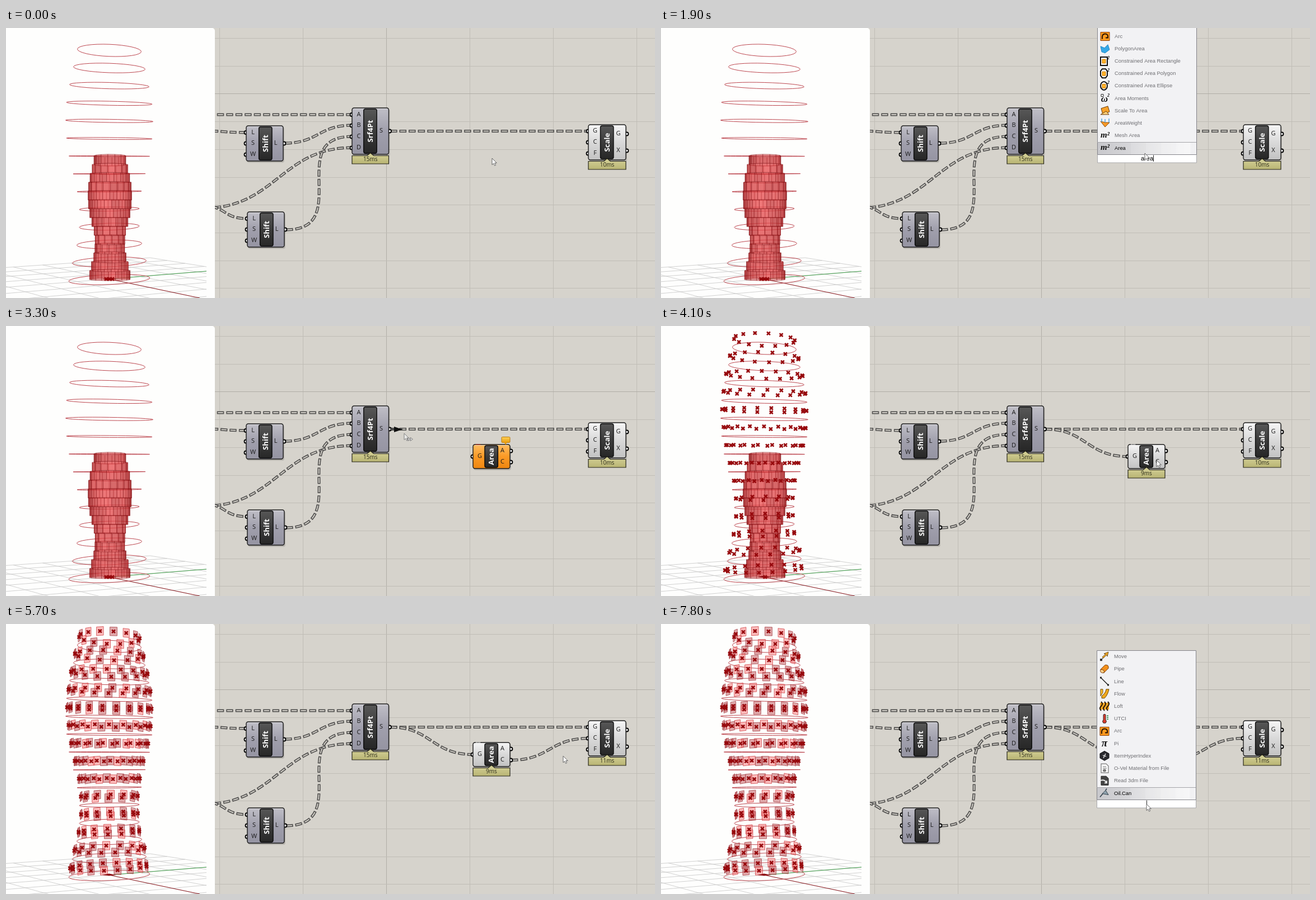
Write an HTML page with a canvas that moves like this. It is 1159x483 px and loops after 8 s.

```html
<!DOCTYPE html>
<html lang="en">
<head>
<meta charset="utf-8">
<title>Node editor: area and scale</title>
<style>
html, body { margin: 0; width: 100%; height: 100%; overflow: hidden; background: #d6d3cc; }
canvas { display: block; width: 1159px; height: 483px; }
</style>
</head>
<body>
<canvas id="stage"></canvas>
<script>
const W = 1159, H = 483, LOOP = 8000, TAU = Math.PI * 2;
const canvas = document.getElementById('stage');
const dpr = window.devicePixelRatio || 1;
canvas.width = W * dpr;
canvas.height = H * dpr;
const c = canvas.getContext('2d');

// ---------- helpers ----------
const SANS = '"Liberation Sans", Arial, sans-serif';
const UI = '"Open Sans", "Noto Sans", sans-serif';

function txt(s, x, y, font, color, align = 'center') {
  c.font = font;
  c.fillStyle = color;
  c.textAlign = align;
  c.textBaseline = 'middle';
  c.fillText(s, x, y);
}
function line(x1, y1, x2, y2, color, w = 1) {
  c.beginPath();
  c.moveTo(x1, y1);
  c.lineTo(x2, y2);
  c.strokeStyle = color;
  c.lineWidth = w;
  c.stroke();
}
function box(x, y, w, h, r, fill, stroke, lw = 1) {
  c.beginPath();
  c.roundRect(x, y, w, h, r);
  if (fill) { c.fillStyle = fill; c.fill(); }
  if (stroke) { c.strokeStyle = stroke; c.lineWidth = lw; c.stroke(); }
}
function poly(points, fill, stroke, lw = 1) {
  c.beginPath();
  points.forEach(([x, y], i) => i ? c.lineTo(x, y) : c.moveTo(x, y));
  c.closePath();
  if (fill) { c.fillStyle = fill; c.fill(); }
  if (stroke) { c.strokeStyle = stroke; c.lineWidth = lw; c.stroke(); }
}
function fade(x1, y1, x2, y2, ...colors) {
  const g = c.createLinearGradient(x1, y1, x2, y2);
  colors.forEach((k, i) => g.addColorStop(i / (colors.length - 1), k));
  return g;
}
const rand = n => { const v = Math.sin(n * 127.1 + 11.7) * 43758.5453; return v - Math.floor(v); };

// ---------- 3D view ----------
const CX = 184.5, EYE = 245;
const RX = [57, 64, 71, 76.5, 78, 76.5, 72, 64.5, 57.5, 53.5, 53.5, 58, 66, 72.5];
const RY = [10.8, 8.4, 5.6, 3.6, 2.8, 1.7, .5, .4, 1.3, 3.6, 6.2, 7.6, 8.6, 8.8];
const ROW_RY = [11.4, 9, 6.8, 4.8, 3.8, 2.3, .8, .6, 1, 3.3, 4, 5.2, 6.4, 6.8];
// x of one marker near the middle of each row: upper arc, lower arc
const UP = [192, 199, 180, 190, 197, 184, 173, 186, 180, 187, 186, 181, 179, 173];
const LOW = [180, 193, 188, 183, 172, 196, 190, 175, 191, 183, 187, 182, 195, 175];
const ringY = i => 40 + 31.54 * i;
const slope = y => -.0002 * (y - EYE);
const sides = i => Math.round(TAU * RX[i] / 26);

const markers = [];
RX.forEach((r, i) => {
  const rx = r - 2.5, cy = ringY(i) - 15.8, step = TAU / sides(i);
  [[UP[i], -1], [LOW[i], 1]].forEach(([x0, dir]) => {
    const a0 = Math.asin((x0 - CX) / rx);
    for (let k = -9; k <= 9; k++) {
      const a = a0 + k * step;
      if (Math.abs(a) > Math.PI / 2) continue;
      const dx = rx * Math.sin(a);
      markers.push({
        x: CX + dx, y: cy + slope(cy) * dx + dir * ROW_RY[i] * Math.cos(a),
        w: 1.5 + 11.5 * Math.cos(a), lit: Math.cos(a) > .45 && rand(markers.length) > .5, a
      });
    }
  });
});

function ground(u, v) {
  const p = u * .034, q = v * .0216, w = 1 + p + q;
  return [(184 - 806 * p + 2780 * q) / w, (449 + 240 * p + 240 * q) / w];
}
function drawGround() {
  c.save();
  c.beginPath();
  c.rect(0, 0, 358, H);
  c.clip();
  for (let u = -6; u <= 4; u++) line(...ground(u, -7), ...ground(u, 4), '#c6c6c6', .8);
  for (let v = -7; v <= 4; v++) line(...ground(-6, v), ...ground(4, v), '#c6c6c6', .8);
  line(184, 449, 358, 435, '#3c9a46');
  line(184, 449, 346, 483, '#8f1c22');
  c.restore();
}
function drawRings() {
  RX.forEach((r, i) => {
    const y = ringY(i);
    c.beginPath();
    c.ellipse(CX, y, r, RY[i], Math.atan(slope(y)), 0, TAU);
    c.strokeStyle = '#b5323c';
    c.lineWidth = .9;
    c.stroke();
  });
}
function drawTower() {
  RX.forEach((r, i) => {
    const rx = r / 2, top = 228.5 + i * 15.8, n = sides(i), step = TAU / n;
    const quads = [];
    for (let k = 0; k < n; k++) quads.push(rand(i) * step + k * step);
    quads.sort((a, b) => Math.cos(a + step / 2) - Math.cos(b + step / 2));
    quads.forEach((a, k) => {
      const at = (b, y) => [185.5 + rx * Math.sin(b), y + RY[i] * .25 * Math.cos(b) * (i < 7 ? -1 : 1)];
      const f = Math.abs(Math.cos(a + step / 2)), s = rand(i * 31 + k) * 40;
      const fill = `rgba(${172 + 66 * f - s},${28 + 56 * f - s * .6},${30 + 56 * f - s * .6},.53)`;
      poly([at(a, top), at(a + step, top), at(a + step, top + 16), at(a, top + 16)], fill, 'rgba(125,14,18,.5)', .8);
    });
  });
}
function cross(x, y) {
  const d = 2.9;
  line(x - d, y - d, x + d, y + d, '#970a0e', 2.7);
  line(x - d, y + d, x + d, y - d, '#970a0e', 2.7);
}
function drawPanel(m) {
  const h = 7.7, t = Math.sin(m.a) * 1.2;
  poly([[m.x - m.w / 2, m.y - h - t], [m.x + m.w / 2, m.y - h + t], [m.x + m.w / 2, m.y + h + t], [m.x - m.w / 2, m.y + h - t]],
    m.lit ? 'rgba(250,110,110,.45)' : 'rgba(185,55,60,.42)', m.lit ? '#d0484c' : '#a5454a', .8);
}
function drawView(T) {
  box(-10, 0, 383, H + 10, 5, '#fefefd');
  drawGround();
  drawRings();
  const scaled = T >= 5600;
  if (!scaled) drawTower();
  else markers.forEach(drawPanel);
  poly([[172, 449], [184, 446.5], [197, 449], [184, 450.5]], '#8f1015');
  if (T >= 4000) markers.forEach(m => cross(m.x, m.y));
  if (T < 4000) [179, 185, 190].forEach(x => cross(x, 449));
  else if (!scaled) cross(186, 449);
}

// ---------- wires ----------
function path(x1, y1, x2, y2, pull) {
  c.beginPath();
  c.moveTo(x1, y1);
  c.bezierCurveTo(x1 + pull, y1, x2 - pull, y2, x2, y2);
}
function wire(x1, y1, x2, y2, pull = (x2 - x1) / 2) {
  path(x1, y1, x2, y2, pull);
  c.setLineDash([12.5, 4]);
  c.strokeStyle = '#4d4c4b';
  c.lineWidth = 5;
  c.stroke();
  c.setLineDash([9.5, 7]);
  c.lineDashOffset = -1.5;
  c.strokeStyle = '#d0cdc6';
  c.lineWidth = 2;
  c.stroke();
  c.setLineDash([]);
  c.lineDashOffset = 0;
}
function looseWire(x1, y1, x2, y2) {
  path(x1, y1, x2, y2, (x2 - x1) / 2);
  c.strokeStyle = '#505050';
  c.lineWidth = 3;
  c.stroke();
  if (x2 - x1 < 30) poly([[x2 - 15, y2 - 5], [x2, y2], [x2 - 15, y2 + 5]], '#111');
}

// ---------- components ----------
const PURPLE = ['#c0bfc7', '#a09fac', '#9594a2'];
const LIGHT = ['#f6f6f6', '#d9d9d9', '#c2c2c2'];
const ORANGE = ['#ffbd62', '#fb9a26', '#ef8610'];

function node({ x, y, w, h, name, skin, ins, outs, time, mid = x + w / 2 - .3 }) {
  const grip = (gx, gy) => {
    c.beginPath();
    c.arc(gx, gy, 3, 0, TAU);
    c.fillStyle = '#fff';
    c.fill();
    c.strokeStyle = '#000';
    c.lineWidth = 1.8;
    c.stroke();
  };
  box(x + 1, y + 2, w + 1, h + 1, 4, 'rgba(0,0,0,.14)');
  ins.forEach(p => grip(x - .5, p[1]));
  outs.forEach(p => grip(x + w + 1.5, p[1]));
  box(x, y, w, h, 3.5, fade(0, y, 0, y + h, ...skin), '#1c1c1c', 1.4);
  line(x + 3, y + 1.5, x + w - 3, y + 1.5, 'rgba(255,255,255,.55)');
  box(mid - 11.7, y + 2, 23.4, h - 4, 3, fade(0, y, 0, y + h, '#595959', '#3b3b3b', '#262626'), '#080808', 1.4);
  c.save();
  c.translate(mid + 1, y + h / 2);
  c.rotate(-Math.PI / 2);
  txt(name, 0, 0, `bold 13.2px ${UI}`, '#fff');
  c.restore();
  ins.forEach(p => txt(p[0], x + 12, p[1], `11px ${UI}`, '#1a1a1a'));
  outs.forEach(p => txt(p[0], x + w - 13.5, p[1], `11px ${UI}`, '#1a1a1a'));
  if (time) {
    const ty = y + h + 2.5, m = x + w / 2;
    poly([[x, ty], [m - 6, ty], [m, ty - 5], [m + 6, ty], [x + w, ty], [x + w, ty + 14.5], [x, ty + 14.5]],
      fade(0, ty - 3, 0, ty + 14, '#d3cf96', '#b9b574'), '#26251a', 1.2);
    txt(time, m, ty + 7.3, `10px ${UI}`, '#2a2917');
  }
}
function shift(x, y) {
  node({ x, y, w: 66, h: 63, name: 'Shift', skin: PURPLE, mid: x + 34.3,
    ins: [['L', y + 12], ['S', y + 31.5], ['W', y + 51.5]], outs: [['L', y + 31.5]] });
}
function areaNode(done) {
  node({ x: 834, y: 212, w: 66, h: 43, name: 'Area', skin: done ? LIGHT : ORANGE,
    ins: [['G', 233.5]], outs: [['A', 223.5], ['C', 243.5]], time: done && '9ms' });
  for (let k = 0; k < 3; k++) line(839 + k * 3, 212, 841 + k * 3, 212, done ? '#ddd' : '#c42a12', 1.4);
  if (!done) {
    box(885, 198.5, 15, 10, 1.5, fade(0, 198, 0, 209, '#ffd35a', '#e79a0c'), '#b87a10');
    poly([[889, 208], [893, 213], [894, 208]], '#e79a0c');
  }
}
function drawCanvas(T) {
  c.fillStyle = '#d6d3cc';
  c.fillRect(0, 0, W, H);
  const gridColor = i => i === 2 ? '#b0ada6' : '#c0bdb6';
  for (let i = 0; i < 6; i++) {
    const x = 381.5 + i * 149;
    line(x, 0, x, H, gridColor(i));
  }
  for (let i = 0; i < 10; i++) {
    const y = Math.floor(18.5 + i * 49.7) + .5;
    line(373, y, W, y, gridColor(i));
  }

  wire(360, 155, 618, 155);
  wire(350, 184, 429, 187);
  wire(498, 206, 618, 174);
  wire(355, 322, 618, 214, 125);
  wire(350, 318, 431, 341, 45);
  wire(500, 361, 618, 194, 121);
  wire(686, 184.5, 1040, 184.5);
  if (T >= 4000) wire(686, 184.5, 834, 233.5);
  if (T >= 5600) wire(902, 243.5, 1040, 204.5);

  shift(429, 175);
  shift(431, 329);
  node({ x: 618, y: 143, w: 65.5, h: 83, name: 'Srf4Pt', skin: PURPLE, time: '15ms',
    ins: [['A', 155], ['B', 174.5], ['C', 194.5], ['D', 214.5]], outs: [['S', 184.5]] });
  node({ x: 1040, y: 173, w: 67, h: 63, name: 'Scale', skin: LIGHT, time: T < 5600 ? '10ms' : '11ms',
    ins: [['G', 184.5], ['C', 204.5], ['F', 224.5]], outs: [['G', 189.5], ['X', 219.5]] });
  if (T >= 2200) areaNode(T >= 4000);

  const [mx, my] = mouse(T);
  if (T >= 3300 && T < 4000) looseWire(686, 184.5, Math.min(mx - 3, 834), my - 7);
  if (T >= 4600 && T < 5600) T >= 5100 ? looseWire(902, 243.5, 1040, 204.5) : looseWire(902, 243.5, mx, my - 7);
}

// ---------- search popup ----------
const ANCHOR = [
  ['M0-3V7M-4-1H4M-6 2Q-5 7 0 7 5 7 6 2', 0, '#4e94d2', 1.6],
  ['M-2-5a2 2 0 1 0 4 0a2 2 0 1 0-4 0', 0, '#4e94d2', 1.4]];
const framed = shape => [[shape, '#fff', '#111', 2], ['M-5-3H1V4H-5Z', '#ffb428', '#d07a00', 1], ['T', '2', 6, -5, 8]];
const ICONS = {
  cube: [['M-8-4L0-8 8-5V4L0 8-8 4Z', '#8a3410', '#3a1608', 1], ['M-8-4L0-1 8-5M0-1V8M-4-2V6M4-3V6M-8 0L0 3 8 0', 0, '#ff8a30', 1.2]],
  vee: [['M-8-8H8V8H-8Z', '#f08a1c', '#7a4a10', 1], ['M-5-7L0 6 5-7M0-7V6', 0, '#fff0c8', 1.4]],
  add: [['M-8-8H8V8H-8Z', '#fff', '#5b2a86', 1.6], ['M0-6V4M-4 0L0 5 4 0', 0, '#5b2a86', 2.4]],
  spring: [...ANCHOR, ['M-6-7L-2-5 1-8 4-5 8-7', 0, '#f0a020', 2]],
  planes: [['M-7-6L3-8 5 2-5 4Z', '#ffbe3c', '#c85a10', 1.3], ['M-2-1L8 1 6 8-4 6Z', '#f5962a', '#c02a18', 1.3]],
  faces: [['M-8-5H0V2H-8Z', '#2563c9', 0], ['M1-5H8V6H1Z', '#f5a022', 0], ['M-8-6H8', 0, '#222', 1]],
  curve: [['M-7 5C-9-8 2-8 2-2S8 5 8 1', 0, '#222', 2], ['M-8 4h3v3h-3zM1-4h3v3h-3z', '#fff', '#222', 1]],
  xyz: [...ANCHOR, ['M-8-6L-3-2M8-6L3-2M-8 7L-5 4M8 7L5 4', 0, '#222', 1.3]],
  anchor: ANCHOR,
  angle: [['M-8-6L4-5 7 7Z', '#4fa3dc', 0], ['M8 8L-7-6H4', 0, '#1c2a38', 1.8], ['M0-6Q4-2 1 2', 0, '#fff', 1.2]],
  arc: [['M-8-7H8V8H-8Z', '#ff9a1e', '#8a3c00', 1], ['M-5 5Q-6-4 0-4 6-4 5 3H1', 0, '#241000', 2]],
  polygon: [['M-8-4L-1-1 5-7 8 2 0 8-6 6Z', '#35a8e6', '#2288c4', 1]],
  rect: framed('M-8-7H4V8H-8Z'),
  hexa: framed('M-5-8H1L4-4V4L1 8H-5L-8 4V-4Z'),
  ellipse: framed('M-8 0a6 7.5 0 1 0 12 0a6 7.5 0 1 0-12 0'),
  omega: [['T', 'ω', -1, 2, 17], ['T', '2', 6, -5, 8], ['M-7-7h4v4h-4z', '#fff', '#222', 1]],
  scale: [['M-7-4L5-8 8 2-4 7Z', '#f7a22a', '#6b3b08', 1], ['M-8 7L2 1 7 7Z', '#ffd27a', '#6b3b08', 1]],
  weight: [['M-8-3L0 7 8-1 1-1Z', '#f79a28', '#8a4a08', 1], ['M-6-2V-8M0-1V-7M7-1V-8', 0, '#49a0e0', 1.4]],
  m2: [['T', 'm²', 0, 0, 15]],
  move: [['M-5 5L3-3', 0, '#444', 1.2], ['M-4 1L2-4-1-5 7-8 5 0 4-3-2 3Z', '#f2a824', '#5a3a08', .8], ['M-8 4h4v4h-4z', '#333', 0]],
  pipe: [['M-7 1L1-7Q8-8 7-1L-1 7Z', '#f2901c', '#7a3c08', 1], ['M-7 1Q-9 8-1 7 1 1-7 1Z', '#ffd28a', '#7a3c08', 1]],
  line: [['M-6-6L6 6', 0, '#222', 1.5], ['M-8-8h3v3h-3zM5 5h3v3h-3z', '#222', 0]],
  flow: [['M-7-8H-3V-2L-7 4Z', '#ffc02c', '#6b4a08', 1], ['M8-8H3Q2-1-5 4V8H0Q6 2 8-8Z', '#f0a81c', '#6b4a08', 1]],
  loft: [['M-8-6H8V6H-8Z', '#f5a522', 0], ['M-6-8Q-2-4-6 0T-6 8M0-8Q4-4 0 0T0 8M6-8Q10-4 6 0T6 8', 0, '#2a1a08', 2]],
  heat: [['M-2-7Q0-9 2-7V2Q5 5 2 8H-2Q-5 5-2 2Z', '#d8382a', '#333', 1], ['M4-5H7M4-2H7M4 1H7', 0, '#2a8a4a', 1.4]],
  pi: [['T', 'π', 0, 0, 19]],
  hex: [['M0-8.5L8-4V4L0 8.5-8 4V-4Z', '#2a2a2e', '#111', 1], ['M-2 4L2-4M-3-1L3 1', 0, '#ddd', 1.4]],
  doc: [['M-6-8H3L7-4V8H-6Z', '#fafafa', '#777', 1.2], ['M-3-3H3M-3 0H4', 0, '#777', 1], ['M-3 4a3 2.5 0 1 0 6 0a3 2.5 0 1 0-6 0', '#777', 0]],
  read: [['M-6-8H3L7-4V8H-6Z', '#444', '#222', 1], ['M-8 0Q0-3 3 3M0 4L4 4 4 0', 0, '#eee', 1.8]],
  can: [['M-4 1L2-5 7 3Z', '#8fa2ae', '#33414c', 1], ['M-3 1L-8 7M2-5L4-8', 0, '#33414c', 1.6]]
};
function icon(name, x, y) {
  c.save();
  c.translate(x, y);
  ICONS[name].forEach(([d, a, b, w, size]) => {
    if (d === 'T') return txt(a, b, w, `italic bold ${size}px "Liberation Serif", serif`, '#111');
    const p = new Path2D(d);
    if (a) { c.fillStyle = a; c.fill(p); }
    if (b) { c.strokeStyle = b; c.lineWidth = w; c.stroke(p); }
  });
  c.restore();
}
const parse = s => s.split('|').map(e => e.split(':'));
const FOR_A = parse('cube:Angle Split Mesh|vee:Align Vertices|add:Add Elements|spring:AnchorSpring|planes:Align Planes|faces:AlignFaces|curve:Arc Divide|xyz:AnchorXYZ|anchor:Anchor|angle:Angle');
const FOR_AREA = parse('arc:Arc|polygon:PolygonArea|rect:Constrained Area Rectangle|hexa:Constrained Area Polygon|ellipse:Constrained Area Ellipse|omega:Area Moments|scale:Scale To Area|weight:AreaWeight|m2:Mesh Area|m2:Area');
const FOR_LAST = parse('move:Move|pipe:Pipe|line:Line|flow:Flow|loft:Loft|heat:UTCI|arc:Arc|pi:Pi|hex:ItemHyperIndex|doc:O-Vel Material from File|read:Read 3dm File|can:Oil.Can');

function popup(x, bottom, top, items, typed) {
  const w = 177, split = bottom - 15, grey = '#6f6f73';
  box(x + .5, split + .5, w, 14.5, 0, '#fff', '#a9a9ac');
  box(x + .5, top + .5, w, split - top, 0, '#f2f2f4', '#84848a');
  if (items) {
    const first = split - 11.5 - (items.length - 1) * 22.22;
    c.fillStyle = fade(x, 0, x + w, 0, '#c8c8cc', '#d6d6d9', '#e6e6e8', '#f2f2f4');
    c.fillRect(x + 1, split - 21, w - 1, 21);
    for (let k = 0; k < 5; k++) {
      c.fillStyle = 'rgba(255,255,255,.13)';
      c.fillRect(x + 60 + k * 27, split - 21, w - 71 - k * 27, 21);
    }
    line(x, split - 21.5, x + w, split - 21.5, '#a4a4a8');
    items.forEach(([pic, name], i) => {
      const y = first + i * 22.22;
      icon(pic, x + 14, y);
      txt(name, x + 31, y + .5, `9.4px ${SANS}`, i === items.length - 1 ? '#000' : grey, 'left');
    });
  } else {
    txt('Enter a search keyword...', x + w / 2, split - 11.5, `9.4px ${SANS}`, grey);
  }
  const mid = x + 89;
  txt(typed, mid, split + 7.5, `11px ${SANS}`, '#000');
  c.font = `11px ${SANS}`;
  const cx = Math.round(mid + c.measureText(typed).width / 2) + .5;
  line(cx, split + 1.5, cx, split + 13, '#222');
}
function drawPopup(T) {
  if (T >= 1100 && T < 2200) {
    const typed = 'area'.slice(0, Math.max(0, (T - 1200) / 100));
    popup(779, 241, typed ? -5 : 202, typed && (typed.length > 1 ? FOR_AREA : FOR_A), typed);
  }
  if (T >= 7500) popup(778, 329, T < 7800 ? 290 : 47, T >= 7800 && FOR_LAST, '');
}

// ---------- mouse: time, x, y ----------
const MOUSE = [
  [0, 868, 233], [1700, 868, 233], [1900, 864, 224], [2100, 864, 221], [2600, 716, 202],
  [2900, 677, 188], [3100, 686, 189], [3200, 686, 189], [3300, 711, 192], [3900, 832, 240],
  [4100, 885, 240], [4400, 901, 245], [4500, 901, 245], [5100, 1033, 212], [5500, 1033, 212],
  [6400, 862, 321], [6600, 867, 322], [LOOP, 867, 322]
];
function mouse(T) {
  const i = MOUSE.findIndex(k => k[0] > T), [t0, x0, y0] = MOUSE[i - 1], [t1, x1, y1] = MOUSE[i];
  const f = (T - t0) / (t1 - t0);
  return [x0 + (x1 - x0) * f, y0 + (y1 - y0) * f];
}
const ARROW = new Path2D('M0 0V11.6L2.7 9.2 4.6 13.2 6.6 12.3 4.7 8.4H8.3Z');
function drawMouse(T) {
  const [x, y] = mouse(T);
  const drag = (T >= 3300 && T < 4000) || (T >= 4600 && T < 5600);
  c.save();
  c.translate(x, y);
  c.fillStyle = drag ? '#e8e8e6' : '#fff';
  c.strokeStyle = drag ? '#777' : '#555';
  c.lineWidth = .9;
  c.fill(ARROW);
  c.stroke(ARROW);
  if (drag) {
    line(5, 10.5, 14, 10.5, '#777', 1.4);
    [7, 11].forEach(d => poly([[d, 7.5], [d + 4.5, 10.5], [d, 13.5]], '#ddd', '#777', .9));
  }
  c.restore();
}

function draw() {
  const T = Math.floor(performance.now() % LOOP / 100) * 100;
  c.setTransform(dpr, 0, 0, dpr, 0, 0);
  drawCanvas(T);
  drawView(T);
  drawPopup(T);
  drawMouse(T);
  requestAnimationFrame(draw);
}
draw();
</script>
</body>
</html>
```
